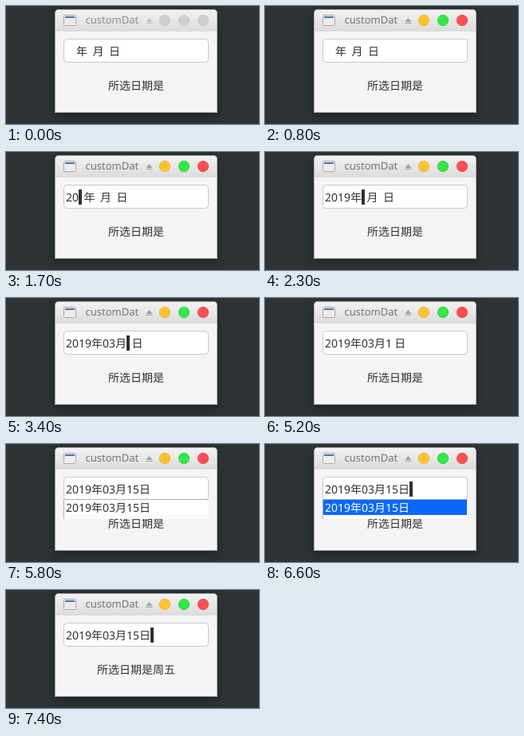
Animation, 317 px wide and 148 px high, one loop 8000 ms. Source, as an HTML page:

```html
<!DOCTYPE html>
<html lang="zh-CN">
<head>
<meta charset="utf-8">
<style>
  html, body { margin: 0; width: 100%; height: 100%; overflow: hidden; background: #2e3436; }
  svg { display: block; }
  text {
    font: 14px "Noto Sans", "Noto Sans CJK SC", "Noto Sans CJK", sans-serif;
    white-space: pre; word-spacing: -.4px; text-rendering: geometricPrecision; fill: #303030;
  }
  #frame { filter: drop-shadow(0 4px 6px rgba(0, 0, 0, .35)); }
  #title { font-size: 13px; fill: #757575; }
  #eject { fill: #a0a0a0; }
  .inactive #title { fill: #8f8f8f; }
  .inactive #eject { fill: #c2c2c2; }
  .inactive .button { fill: #cfcfcf; stroke: #c9c9c9; }
</style>
</head>
<body>
<svg id="stage" width="317" height="148" viewBox="0 0 317 148">
  <defs>
    <linearGradient id="bar" x2="0" y2="1">
      <stop stop-color="#f3f2f2"/>
      <stop offset="1" stop-color="#dcdbdb"/>
    </linearGradient>
  </defs>
  <rect width="317" height="148" fill="#2e3436"/>

  <path id="frame" d="M61 134V9a5 5 0 0 1 5-5H260a5 5 0 0 1 5 5V134Z" fill="#a0a3a4"/>
  <path d="M62 133V9a4 4 0 0 1 4-4H260a4 4 0 0 1 4 4V133Z" fill="#f4f4f4"/>
  <path d="M62 32V9a4 4 0 0 1 4-4H260a4 4 0 0 1 4 4V32Z" fill="url(#bar)"/>

  <rect x="72.5" y="11.5" width="15" height="13" rx="1" fill="#ececec" stroke="#a9abab"/>
  <rect x="74" y="13" width="12" height="2" fill="#4a74a8"/>
  <text id="title" x="99.5" y="22">customDat</text>
  <path id="eject" d="M175.500 20L179.500 15L183.500 20ZM175.500 21H183.500V22H175.500Z"/>
  <circle class="button" cx="199" cy="18" r="6.7" fill="#fdc32f" stroke="#e8b02a" stroke-width=".8"/>
  <circle class="button" cx="223" cy="18" r="6.7" fill="#34e648" stroke="#2bcd3d" stroke-width=".8"/>
  <circle class="button" cx="247" cy="18" r="6.7" fill="#fb4f55" stroke="#e2454b" stroke-width=".8"/>

  <rect x="72.5" y="41.5" width="181" height="29" rx="4" fill="#fff" stroke="#c8c8c8"/>
  <text id="field" x="75" y="62"></text>
  <rect id="cursor" y="47" width="4" height="19" fill="#303030"/>
  <text id="label" x="163" y="105" text-anchor="middle"></text>

  <g id="popup">
    <rect x="72" y="69" width="182" height="25" fill="#fbfbfb"/>
    <path d="M72.500 94V69.500H254" fill="none" stroke="#b0b0b0"/>
    <rect id="item" x="73" y="70" width="180" height="19"/>
    <text id="itemText" x="75" y="85">2019年03月15日</text>
  </g>
</svg>
<script>
const LOOP = 8000;
const DIGITS = "20190315";
const keyTimes = [1400, 1700, 2000, 2300, 3100, 3400, 4600, 5300];
const blinkTimes = [300, 800, 1400, 2900, 3100, 4000, 4500, 5200, 5300, 5800, 6400, 6900, 7400];

const $ = id => document.getElementById(id);
const countPassed = (times, t) => times.filter(time => t >= time).length;
const show = (id, on) => $(id).setAttribute("visibility", on ? "visible" : "hidden");

function maskedDate(count) {
  const s = DIGITS.slice(0, count).padEnd(8);
  return `${s.slice(0, 4)}年${s.slice(4, 6)}月${s.slice(6)}日`;
}

// The cursor skips the fixed character once a group of digits is full.
function cursorX(count) {
  const fixedPassed = countPassed([4, 6, 8], count);
  return count ? 75 + count * 8 + fixedPassed * 14 : 76;
}

function draw(t) {
  const count = countPassed(keyTimes, t);
  $("stage").classList.toggle("inactive", t < 300);
  $("field").textContent = maskedDate(count);
  $("cursor").setAttribute("x", cursorX(count));
  show("cursor", countPassed(blinkTimes, t) % 2);
  show("popup", t >= 5300 && t < 6800);
  const selected = t >= 6600;
  $("item").style.fill = selected ? "#0a68ff" : "#fff";
  $("itemText").style.fill = selected ? "#fff" : "#303030";
  $("label").textContent = t < 7400 ? "所选日期是" : "所选日期是周五";
}

function tick() {
  draw(performance.now() % LOOP);
  requestAnimationFrame(tick);
}
tick();
</script>
</body>
</html>
```
